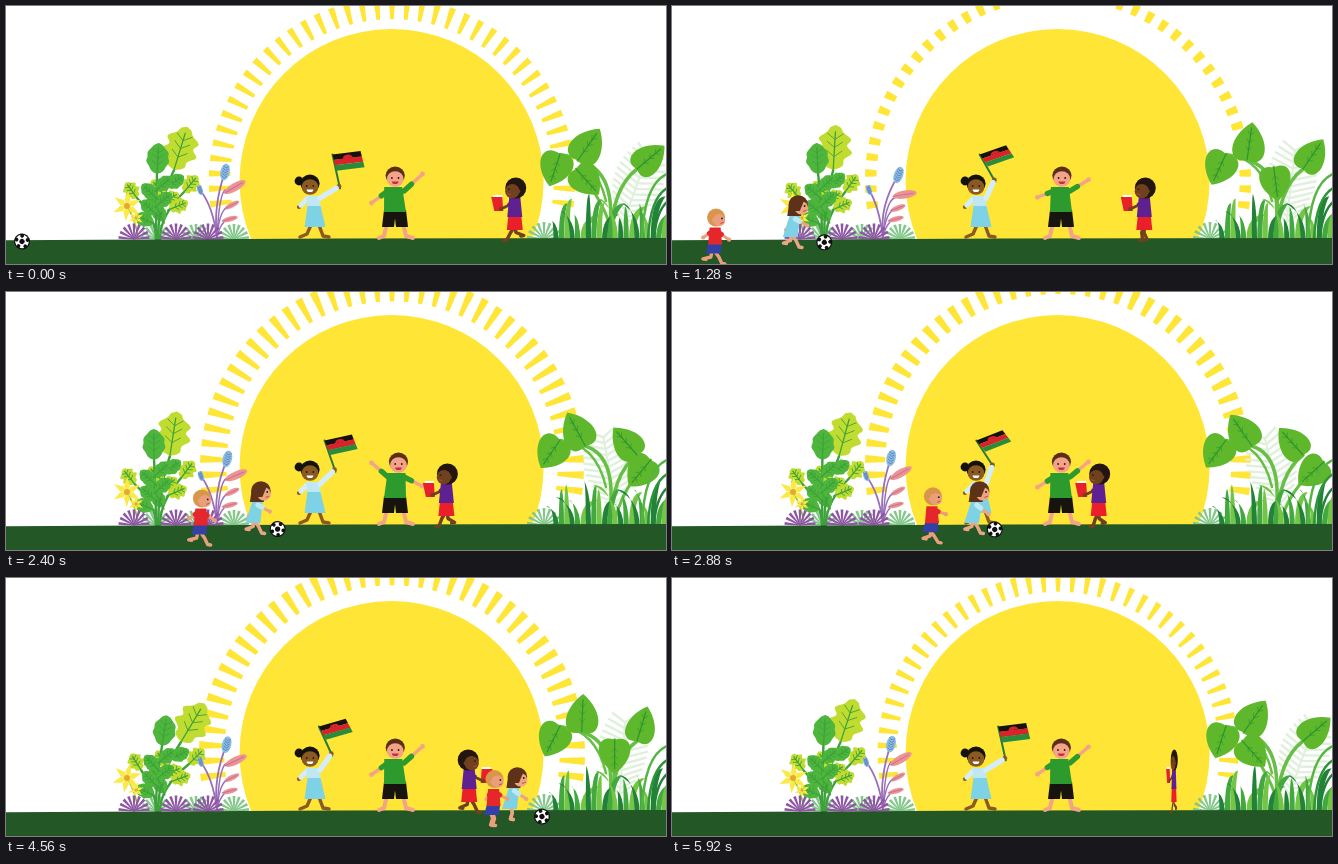
An HTML page with a canvas for the animation above (6 s loop, 660x258 px).

```html
<!DOCTYPE html>
<html lang="en">
<head>
<meta charset="utf-8">
<title>Children in the sun</title>
<style>
html, body { margin: 0; width: 660px; height: 258px; overflow: hidden; background: #fff; }
canvas { display: block; }
</style>
</head>
<body>
<canvas id="stage" width="660" height="258"></canvas>
<script>
const g = document.getElementById('stage').getContext('2d');
const LOOP = 6000, STEP = 80, TAU = Math.PI * 2;
const LIME = '#c1dc30', GREEN = '#4fb63d', STEM = '#3da23a', HEART = '#5fb82c';
const wave = (t, period) => Math.cos(TAU * t / period);
const rad = deg => deg * Math.PI / 180;
const clamp = (v, lo, hi) => Math.min(hi, Math.max(lo, v));
const mix = (a, b, u) => [a[0] + (b[0] - a[0]) * u, a[1] + (b[1] - a[1]) * u];

function poly(fill, ...pts) {
  g.beginPath();
  pts.forEach(p => g.lineTo(...p));
  g.closePath();
  g.fillStyle = fill;
  g.fill();
}
function stroke(color, width) {
  g.strokeStyle = color;
  g.lineWidth = width;
  g.lineCap = g.lineJoin = 'round';
  g.stroke();
}
function line(color, width, ...pts) {
  g.beginPath();
  pts.forEach(p => g.lineTo(...p));
  stroke(color, width);
}
function curve(color, width, a, b, c) {
  g.beginPath();
  g.moveTo(...a);
  g.quadraticCurveTo(...b, ...c);
  stroke(color, width);
}
function oval(fill, x, y, rx, ry = rx, from = 0, to = TAU) {
  g.beginPath();
  g.ellipse(x, y, rx, ry, 0, from, to);
  g.fillStyle = fill;
  g.fill();
}
// Trapezoid hanging from the middle of its top edge.
function trap(fill, x, y, top, bottom, h, lean = 0) {
  poly(fill, [x - top / 2, y], [x + top / 2, y], [x + lean + bottom / 2, y + h], [x + lean - bottom / 2, y + h]);
}
function at(x, y, deg, draw, sx = 1) {
  g.save();
  g.translate(x, y);
  g.rotate(rad(deg));
  g.scale(sx, 1);
  draw();
  g.restore();
}
function seeded(seed) {
  return () => (seed = seed * 16807 % 2147483647) / 2147483647;
}

// ---- sun: each ring of rays grows outward, then its inner edge follows ----
function rays(age) {
  const inner = Math.min(193, 160 + 33 * (age / 1.1) ** 2);
  const outer = 193 - 33 * Math.max(0, 1 - age / .55) ** 2;
  const width = r => 3.4 + (r - 160) * .13;
  for (let i = -20; i <= 20; i++)
    at(386, 175, i * 360 / 74, () => trap('#ffe535', 0, -outer, width(outer), width(inner), outer - inner));
}
function sun(t) {
  const age = (t / 2000 + .25) % 1;
  rays(age);
  rays(age + 1);
  oval('#ffe535', 385.6, 175, 152);
}

// ---- plants ----
function fan(x, r, color) {
  for (let a = -84; a <= 84; a += 21) at(x, 233, a, () => trap(color, 0, -r, 2.8, 1, r));
}
function heart(x, y, deg, len, w) {
  at(x, y, deg, () => {
    g.beginPath();
    g.moveTo(0, 0);
    g.bezierCurveTo(-w * .6, len * .2, -w * .75, -len * .5, 0, -len);
    g.bezierCurveTo(w * .75, -len * .5, w * .6, len * .2, 0, 0);
    g.fillStyle = HEART;
    g.fill();
    line('#2c9430', 1.2, [0, 0], [0, -len * .85]);
    for (const u of [.25, .45, .65])
      line('#2c9430', .6, [-3, -len * (u + .1)], [0, -len * u], [3, -len * (u + .1)]);
  });
}
// Leaf with a wavy edge, growing up from its stalk.
function lobed(x, y, deg, len, w, color) {
  const wavy = color === LIME ? .2 : .06;
  at(x, y, deg, () => {
    const side = [];
    for (let i = 0; i <= 20; i++) {
      const u = i / 20;
      side.push([w / 2 * Math.sin(3.14 * u) ** .6 * (1 + wavy * Math.sin(u * 20)), -u * len]);
    }
    poly(color, ...side, ...side.map(([a, b]) => [-a, b]).reverse());
    line(STEM, 1.3, [0, 2], [0, -len * .85]);
    for (const u of [.3, .5, .68])
      line(STEM, .8, [-w * .25, -len * (u + .13)], [0, -len * u], [w * .25, -len * (u + .13)]);
  });
}
// Curved stalk with a leaf on top and smaller ones alternating below.
function sprig(foot, top, pairs, len, deg, color) {
  const bend = [foot[0], (foot[1] + top[1]) / 2];
  curve(STEM, 2.4, foot, bend, top);
  for (let i = 0; i < pairs * 2; i++) {
    const u = .38 + i * .5 / (pairs * 2);
    const [x, y] = mix(mix(foot, bend, u), mix(bend, top, u), u);
    lobed(x, y, (i % 2 ? 48 : -48) + deg / 2, 20, 14, i % 3 ? color : GREEN);
  }
  lobed(...top, deg, len, len * .62 + 3, color);
}
function leftBush(t) {
  const sway = -Math.sin(TAU * t / LOOP);
  sprig([150, 233], [131 + sway * 4, 192], 1, 19, -36 + sway * 4, LIME);
  sprig([154, 233], [178 + sway * 5, 186], 1, 21, 40 + sway * 5, LIME);
  sprig([152, 233], [168 + sway * 7, 164], 2, 45, 17 + sway * 14, LIME);
  sprig([150, 233], [151 + sway * 5, 168], 2, 31, 3 + sway * 6, GREEN);

  curve('#7fbb3d', 1.5, [132, 232], [130, 215], [122, 202]);
  for (const [x, y, r] of [[121, 200, 15], [130, 212, 8]]) {
    for (let a = 5; a < 360; a += 60) at(x, y, a + sway * 7, () =>
      poly('#fbea45', [0, 0], [-r * .2, -r * .4], [0, -r], [r * .2, -r * .4]));
    oval('#e2aa35', x, y, r * .2);
  }
}
function purplePlant(t) {
  const d = 4 * (1 - wave(t, LOOP / 2)) * (.6 + .4 * Math.sin(TAU * t / LOOP));
  const stem = '#9a6fb8', foot = [211, 232];
  const bud = (x, y, deg, r) => {
    curve(stem, 1.8, foot, [207, 200], [x, y]);
    at(x, y, deg, () => {
      oval('#86bfe2', 0, 0, r * .55, r);
      for (let i = -2; i < 3; i++) line('#6d83c4', .9, [-r * .3, i * r * .3 - 1], [0, i * r * .3 + 1], [r * .3, i * r * .3 - 1]);
    });
  };
  const petal = (x, y, deg, len) => {
    curve(stem, 1.5, foot, [213, y + 8], [x - len + 2, y + 3]);
    at(x, y, deg, () => {
      oval('#f0938f', 0, 0, len, len / 3);
      line('#b874aa', 1, [-len, 0], [len * .7, 0]);
    });
  };
  bud(219 + d, 166 + d * .4, 12 + d, 8.5);
  bud(194 + d * .4, 184, -18, 5);
  petal(229 + d * .5, 181 + d, -30 + d * 2.8, 12);
  petal(226, 199 + d * .4, -28 + d, 8);
  petal(224, 213, -15, 8);
}
function fern(x, y, deg) {
  at(x, y, deg, () => {
    line('#e0f0dc', 2, [0, 0], [0, -84]);
    for (let h = 12; h < 85; h += 6) {
      const w = 22 * Math.sin(h / 100 * Math.PI) + 2;
      line('#e0f0dc', 2.4, [-w, -h - 8], [0, -h], [w, -h - 8]);
    }
  });
}
function blade(x, h, lean, w, color) {
  g.beginPath();
  g.moveTo(x - w, 234);
  g.quadraticCurveTo(x - w, 234 - h, x + lean, 234 - h);
  g.quadraticCurveTo(x + w, 234 - h * .7, x + w, 234);
  g.fillStyle = color;
  g.fill();
}
function rightBush(t) {
  const c = wave(t, LOOP), stem = '#67bf45';
  fern(613, 228, 3 + 17 * c);
  const big = [576 - 4 * c, 154], far = [631, 163], low = [554, 148];
  const turn = 183 - 45 * c;
  const hang = [610.5 - 29.5 * c - Math.sin(rad(turn)) * 16, 178 - 3 * c + Math.cos(rad(turn)) * 16];
  curve(stem, 3.5, [602, 234], [614, 165], big);
  curve(stem, 3.5, [604, 234], [606, 182], far);
  curve(stem, 3, [608, 234], [608 - 8 * c, 196], hang);
  curve(stem, 2.5, [600, 195], [590, 152], low);
  heart(...low, 207 - 9 * c, 34, 33);
  heart(...hang, turn, 34, 31);
  heart(...big, 35 * c, 38, 32);
  heart(...far, 4 + 46 * Math.tanh(3 * c + .1), 36, 29);

  fan(538, 17, '#83c78a');
  const rnd = seeded(71);
  for (let i = 0; i < 21; i++)
    blade(550 + i * 5.4, 20 + rnd() * 26, (rnd() - .5) * 46 + 3 * c, 2.6, ['#228338', '#43a83d', '#72c545'][i % 3]);
  for (let i = 0; i < 3; i++)
    curve(['#55b541', '#2e9439', '#228338'][i], 2.5, [636 + i * 6, 233], [638 + i * 6, 178 + i * 14], [661, 168 + i * 14]);
}
function plants(t) {
  for (const x of [150, 190, 228]) fan(x, 15, '#83c78a');
  leftBush(t);
  purplePlant(t);
  for (const x of [128, 170, 202]) fan(x, 15.5, '#8f55a5');
  rightBush(t);
}

// ---- children ----
function frontFace(x, y, r, skin, hair, mouth) {
  oval(hair, x, y - 2.5, r + 1.2, r + .5);
  oval(skin, x, y + 1, r, r - .6);
  for (const side of [-1, 1]) oval('#2a1710', x + side * 3.3, y, .9);
  oval(mouth, x, y + 3.5, 3.3, 2.6, 0, Math.PI);
}
function sideFace(x, y, r, skin, hair) {
  oval(hair, x, y, r);
  oval(skin, x + r * .33, y + r * .3, r * .68);
  oval(skin, x - r * .25, y + r * .3, 1.9);
  oval('#2a1710', x + r * .65, y + r * .1, .9);
  line('#c2473f', .9, [x + r * .5, y + r * .65], [x + r * .8, y + r * .55]);
}
// Arm with a sleeve that covers part of it.
function arm(skin, sleeve, from, to, cover = .4, w = 3.4) {
  line(skin, w, from, to);
  oval(skin, ...to, w * .7);
  line(sleeve, w + 2, from, mix(from, to, cover));
}
// Swing -1 is stretched back and lifted, 1 is forward on the ground.
function leg(skin, x, y, len, swing, reach) {
  const fx = x + swing * reach, fy = y + len + Math.min(0, swing) * reach * .5;
  line(skin, 3.4, [x, y], [x + swing * reach * .35 + 2, y + len * .5], [fx, fy], [fx + 3, fy + .5]);
}

function flagGirl(t) {
  const w = wave(t, 2000), skin = '#8a5a22';
  const hand = [326.5 + 6.5 * w, 174.5 + 4 * w], corner = [315 + 11.5 * w, 148.5];
  line('#2a7a38', 2, [hand[0] + 1, hand[1] + 4], corner);
  g.save();
  g.transform(27 + w, -7 + 3.5 * w, 6.5 - 2.5 * w, 13.5 + 2.5 * w, ...corner);
  ['#16120f', '#d8232a', '#2a8b3c'].forEach((color, i) => {
    g.fillStyle = color;
    g.fillRect(0, i / 3, 1, .345);
  });
  oval('#d8232a', .5, .33, .17, .21, Math.PI, TAU);
  g.restore();

  line(skin, 3.4, [305, 219], [301, 228], [294, 231]);
  line(skin, 3.4, [313, 219], [317, 230], [323, 231]);
  arm(skin, '#d3eefa', [302, 192], [293, 201], .8, 3);
  trap('#bfe8f3', 307, 190, 13, 14, 12, 1);
  trap('#7dd2e6', 308, 200, 13, 21, 21, 1);
  arm(skin, '#d3eefa', [314, 192], [hand[0], hand[1] + 2], .85);
  oval('#15110f', 293, 175, 4.4);
  frontFace(304, 180, 8.4, skin, '#15110f', '#fff');
}

function greenBoy(t) {
  const c = wave(t, 1500), skin = '#f2a388', shirt = '#2c9a2c';
  for (const side of [-1, 1]) {
    line(skin, 4, [389 + side * 8, 217], [389 + side * 11, 230], [390 + side * 17, 232]);
    trap('#17130f', 389 + side * 5, 204, 12, 12, 17, side * 2);
    arm(skin, shirt, [390 + side * 8, 185], [391 + side * 25.5, 182.5 - side * 14.5 * c]);
  }
  trap(shirt, 389 - 1.8 * c, 181, 18, 22, 25, 1.8 * c);
  frontFace(391 - 1.8 * c, 172, 8.4, skin, '#5b2f16', '#c92f36');
}

function reader(t) {
  const x = 421 + .0285 * Math.abs(t - LOOP / 2 - STEP);
  const facing = Math.max(clamp((3160 - t) / 80, -1, 1), clamp((t - 5880) / 120, -1, 1));
  const step = wave(t, 1000), skin = '#70411f', shirt = '#5f2091';
  // Drawn looking right, so the facing sign is flipped.
  at(x, 232, 0, () => {
    leg(skin, -1, -13, 15, step, 9);
    leg(skin, 0, -13, 15, -step, 9);
    trap('#ea1f2a', 0, -22, 13, 16, 14);
    trap(shirt, 0, -41, 11, 15, 20);
    sideFace(-1, -50, 10.5, skin, '#241511');
    trap('#fff', 17, -43, 9, 9, 12);
    trap('#e8202a', 18, -41, 11, 9, 14, -2);
    arm(skin, shirt, [-1, -36], [14, -29], .4, 3);
  }, -facing);
}

const ballX = t => 16 + .1065 * t + .022 * Math.max(0, t - LOOP / 2);

function kicker(t) {
  const s = wave(t - 1840, 640), skin = '#eaa582';
  at(ballX(t) - 23 - 9 * wave(t, LOOP), 200, 0, () => {
    leg(skin, -8, 28, 13, -s, 11);
    leg(skin, -8, 28, 13, s, 11);
    arm(skin, '#7dd2e6', [-7, 13], [-9 - 6 * s, 24], .3, 3);
    trap('#7dd2e6', -4, 8, 10, 15, 23, -5);
    arm(skin, '#bfe8f3', [-4, 13], [8, 21 - 2 * s], .35, 3);
    trap('#5d3218', -4, 0, 13, 14, 10, -1);
    sideFace(-1, -1, 9.8, skin, '#5d3218');
    trap('#5d3218', -1, -7, 13, 9, 12, -3);
  });
}

function runner(t) {
  const s = wave(t - 1840, 640), skin = '#ea9f7c', shirt = '#e5262b';
  at(121 + .1355 * (t - 1840), Math.max(202, 210 - .0045 * (t - 1840)), 0, () => {
    leg(skin, -5, 32, 13, -s, 13);
    leg(skin, -3, 32, 13, s, 11);
    arm(skin, shirt, [-5, 13], [-9 - 7 * s, 19], .3, 3);
    trap('#3340a5', -2, 24, 13, 15, 11, -2);
    trap(shirt, -2, 9, 11, 14, 17);
    arm(skin, shirt, [0, 13], [12, 19 + 3 * s], .35, 3);
    sideFace(-1, -1, 9, skin, '#d9964b');
  });
}

function ball(t) {
  const x = ballX(t);
  at(x, 235.5 + t / 1500, x * 8, () => {
    oval('#111', 0, 0, 8);
    oval('#fff', 0, 0, 6.8);
    oval('#111', 0, 0, 2.6);
    for (let a = 0; a < 5; a++)
      oval('#111', Math.cos(a * TAU / 5) * 5.8, Math.sin(a * TAU / 5) * 5.8, 1.9);
  });
}

function draw(t) {
  g.fillStyle = '#fff';
  g.fillRect(0, 0, 660, 258);
  sun(t);
  plants(t);
  poly('#235726', [0, 234.3], [330, 232.4], [660, 232], [660, 258], [0, 258]);
  for (const part of [flagGirl, greenBoy, reader, kicker, runner, ball]) part(t);
}

const start = performance.now();
function tick() {
  const t = (performance.now() - start) % LOOP;
  draw(Math.floor(t / STEP) * STEP);
  requestAnimationFrame(tick);
}
tick();
</script>
</body>
</html>
```
